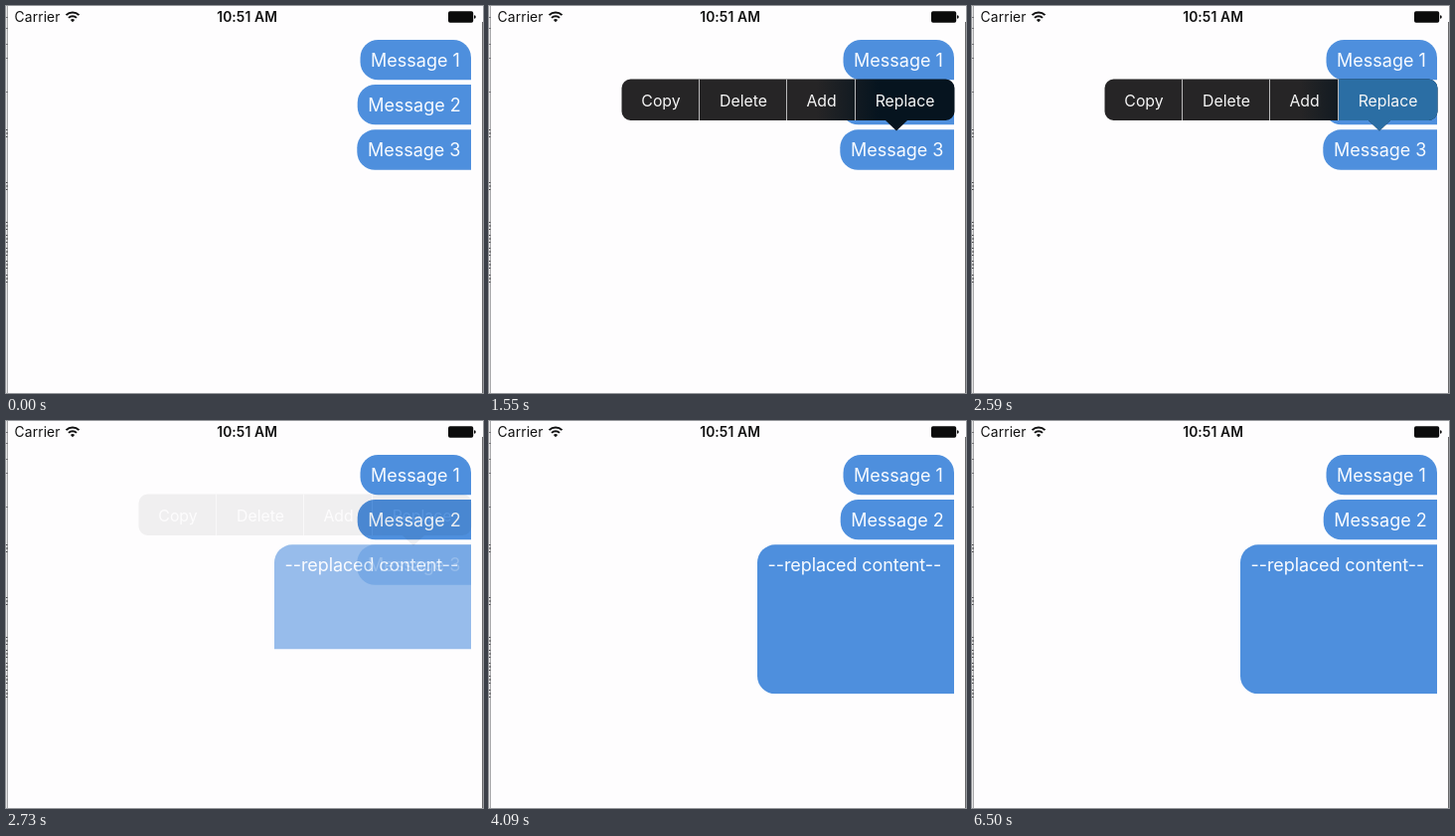
These frames come from a looping animation (480x389 px, 7100 ms). An HTML page:

```html
<!DOCTYPE html>
<html lang="en">
<head>
<meta charset="utf-8">
<title>Message menu</title>
<style>
  html, body { margin: 0; width: 100%; height: 100%; overflow: hidden; background: #fefdfe; }
  svg { display: block; width: 100vw; height: 100vh; }
  text { font-family: Inter, Roboto, sans-serif; white-space: pre; }
  .status { font-size: 13.8px; fill: #111; letter-spacing: .12px; }
  .bubble path { fill: #4e8fdd; }
  .bubble text { font-size: 18px; fill: #f8fbff; }
  .menu text { font-size: 15.8px; fill: #f6f6f6; text-anchor: middle; }
</style>
</head>
<body>
<svg viewBox="0 0 480 389" preserveAspectRatio="none">
  <defs>
    <linearGradient id="glass" gradientUnits="userSpaceOnUse" x1="330" x2="392">
      <stop offset="0" stop-color="#262526"/>
      <stop offset="1" stop-color="#06141f"/>
    </linearGradient>
    <clipPath id="cell"><rect id="cellBox" x="260" y="124" width="210" height="150.5"/></clipPath>
  </defs>
  <rect width="480" height="389" fill="#fefdfe"/>

  <!-- slivers of the windows behind -->
  <g id="edge">
    <rect width="1" height="389" fill="#e4e4e5"/>
    <rect x="1" width="1" height="389" fill="#a9a9ab"/>
    <rect x="479" y="16" width="1" height="373" fill="#69696b"/>
  </g>

  <text class="status" x="8.6" y="16">Carrier</text>
  <g fill="none" stroke="#111" stroke-width="2">
    <path d="M60.5 9.1A9.3 9.3 0 0 1 73.5 9.1"/>
    <path d="M63 11.9A5.8 5.8 0 0 1 71 11.9"/>
    <path d="M67 16.2L64.9 14A3 3 0 0 1 69.1 14Z" fill="#111" stroke="none"/>
  </g>
  <text class="status" x="242.6" y="16" text-anchor="middle" font-weight="600">10:51 AM</text>
  <rect x="445" y="5.3" width="25.2" height="11.4" rx="1.8" fill="#0b0b0b"/>
  <path d="M471 9.2Q472.8 9.4 472.8 11T471 12.8Z" fill="#0b0b0b"/>

  <g id="list"></g>

  <g id="menu" class="menu">
    <path fill="url(#glass)" d="M142.5 73.5H459.5A9 9 0 0 1 468.5 82.5V106A9 9 0 0 1 459.5 115H421L410 125.5L399 115H142.5A9 9 0 0 1 133.5 106V82.5A9 9 0 0 1 142.5 73.5Z"/>
    <path id="pressed" fill="#2b6ea4" d="M368.5 73.5H459.5A9 9 0 0 1 468.5 82.5V106A9 9 0 0 1 459.5 115H421L410 125.5L399 115H368.5Z"/>
    <path d="M211.5 73.5V115M299.5 73.5V115M368.5 73.5V115" stroke="#b9b9ba"/>
  </g>
</svg>
<script>
const LOOP = 7100;
const NS = 'http://www.w3.org/2000/svg';
const $ = id => document.getElementById(id);

function add(parent, tag, attrs, label) {
  const el = document.createElementNS(NS, tag);
  for (const key in attrs) el.setAttribute(key, attrs[key]);
  if (label) el.textContent = label;
  return parent.appendChild(el);
}

// Left corners are always round; the top right one only on the first bubble.
function bubble(label, x, y, h, topRight = 0, spacing = 0) {
  const r = 18, right = 468, bottom = y + h;
  const g = add($('list'), 'g', { class: 'bubble' });
  add(g, 'path', {
    d: `M${x + r} ${y}H${right - topRight}A${topRight} ${topRight} 0 0 1 ${right} ${y + topRight}` +
       `V${bottom}H${x + r}A${r} ${r} 0 0 1 ${x} ${bottom - r}V${y + r}A${r} ${r} 0 0 1 ${x + r} ${y}Z`
  });
  add(g, 'text', { x: x + 10.6, y: y + 26.7, 'letter-spacing': spacing }, label);
  return g;
}

bubble('Message 1', 356.5, 34, 40.3, 18);
bubble('Message 2', 353.7, 79, 40.3);
const oldCell = bubble('Message 3', 353.3, 124.3, 40.5);
const newCell = bubble('--replaced content--', 270, 124.3, 150, 0, -.1);
newCell.setAttribute('clip-path', 'url(#cell)');

[['Copy', 173], ['Delete', 256], ['Add', 334.5], ['Replace', 418.5]]
  .forEach(([label, x]) => add($('menu'), 'text', { x, y: 100.6 }, label));

[11, 22, 38, 52, 86].forEach(y => add($('edge'), 'rect', { y, width: 2, height: 1, fill: '#77777a' }));
[128, 181, 221, 234, 247, 260, 274].forEach(y => {
  add($('edge'), 'path', { d: `M0 ${y - 3.5}H1.5M0 ${y}H2M0 ${y + 3.5}H1.5`, stroke: '#48484b' });
});

const span = (t, from, to) => Math.min(1, Math.max(0, (t - from) / (to - from)));
const ease = p => p * p * (3 - 2 * p);

function draw(t) {
  const swap = ease(span(t, 2600, 2835));
  const shown = ease(span(t, 1300, 1540)) * (1 - ease(span(t, 2600, 2754)));
  oldCell.setAttribute('opacity', 1 - swap);
  newCell.setAttribute('opacity', swap);
  $('cellBox').setAttribute('height', 41 + 109.5 * swap);
  $('menu').setAttribute('opacity', shown);
  $('pressed').setAttribute('visibility', t >= 2500 && t < 2600 ? 'visible' : 'hidden');
}

const start = performance.now();
function tick() {
  draw((performance.now() - start) % LOOP);
  requestAnimationFrame(tick);
}
tick();
</script>
</body>
</html>
```
